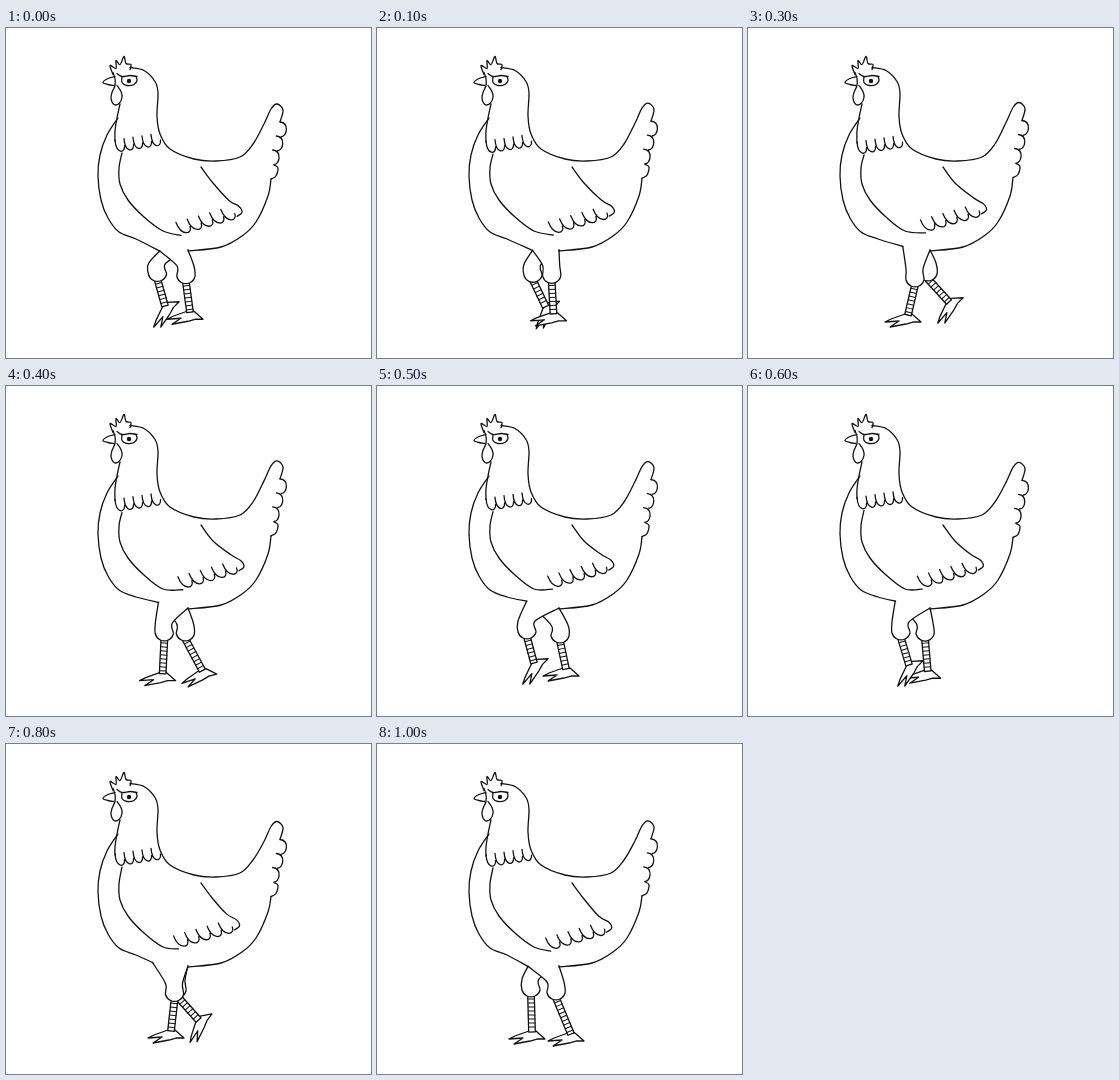
Recreate the animation shown at these times as an HTML page with a canvas. Size 365 px wide and 330 px high, loop 1100 ms.

```html
<!DOCTYPE html>
<html lang="en">
<head>
<meta charset="utf-8">
<title>Walking hen</title>
<style>
html, body { margin: 0; width: 100%; height: 100%; overflow: hidden; background: #fff; }
canvas { display: block; }
</style>
</head>
<body>
<canvas id="stage" width="365" height="330"></canvas>
<script>
const ctx = document.getElementById('stage').getContext('2d');
const STEP = 100, STEPS = 11;
const INK = '#111', PAPER = '#fff';

// One stride, shared by both legs: phase, knee x,y, ankle x,y, foot angle
const gait = [
  [0.3, 178, 253, 181, 285, 0],
  [2, 170, 254, 170, 287, 0],
  [3, 167, 257, 160, 287, 0],
  [4.5, 154, 251, 155, 288, 0],
  [5, 150, 251, 157, 277, -45],
  [6, 153, 252, 161, 279, -45],
  [7.5, 162, 253, 184, 278, -60],
  [8.5, 180, 251, 201, 274, -45],
  [10, 179, 254, 194, 290, 0],
  [10.5, 183, 255, 189, 283, 0]
];

function stride(phase) {
  phase %= STEPS;
  if (phase < gait[0][0]) phase += STEPS;
  let i = gait.length - 1;
  while (gait[i][0] > phase) i--;
  const a = gait[i], b = gait[(i + 1) % gait.length];
  const end = b[0] > a[0] ? b[0] : b[0] + STEPS;
  const k = (phase - a[0]) / (end - a[0]);
  return a.map((n, j) => n + (b[j] - n) * k).slice(1);
}

const pairs = list => {
  const out = [];
  for (let i = 0; i < list.length; i += 2) out.push([list[i], list[i + 1]]);
  return out;
};

// Smooth open curve through the points
function curve(list, fill) {
  const p = pairs(list), last = p.length - 1;
  ctx.beginPath();
  ctx.moveTo(...p[0]);
  for (let i = 0; i < last; i++) {
    const a = p[Math.max(i - 1, 0)], b = p[i], c = p[i + 1], d = p[Math.min(i + 2, last)];
    ctx.bezierCurveTo(b[0] + (c[0] - a[0]) / 6, b[1] + (c[1] - a[1]) / 6,
      c[0] - (d[0] - b[0]) / 6, c[1] - (d[1] - b[1]) / 6, ...c);
  }
  if (fill) ctx.fill();
  ctx.stroke();
}

function poly(list, fill) {
  ctx.beginPath();
  pairs(list).forEach(p => ctx.lineTo(...p));
  if (fill) { ctx.closePath(); ctx.fill(); }
  ctx.stroke();
}

// Row of feather tips; each ends partway down the side of the next
function feathers(x0, y0, x1, y1, count, dx, dy) {
  const sx = (x1 - x0) / count, sy = (y1 - y0) / count;
  ctx.beginPath();
  for (let i = 0; i < count; i++) {
    const x = x0 + sx * i, y = y0 + sy * i;
    const nx = x + sx + dx * 0.55, ny = y + sy + dy * 0.55;
    ctx.moveTo(x, y);
    ctx.bezierCurveTo(x + dx * 1.1, y + dy * 1.1, nx + dx * 0.6, ny + dy * 0.6, nx, ny);
  }
  ctx.stroke();
}

function at(x, y, draw, turn = 0) {
  ctx.save();
  ctx.translate(x, y);
  ctx.rotate(turn * Math.PI / 180);
  draw();
  ctx.restore();
}

function foot() {
  poly([-3, -1, -17, 4, -23, 7, -9, 6, -18, 12, -2, 9, 5, 7, 13, 7, 4, -1], true);
}

function leg([kx, ky, ax, ay, turn], hipX, hipY) {
  const len = Math.hypot(ax - kx, ay - ky);
  at(ax, ay, foot, turn);
  at(kx, ky, () => {
    poly([-3.3, 0, -3.3, len, 3.3, len, 3.3, 0], true);
    ctx.lineWidth = 1;
    for (let y = 4; y < len - 2; y += 4) poly([-3.3, y, 3.3, y]);
  }, Math.atan2(kx - ax, ay - ky) * 180 / Math.PI);
  curve([hipX, hipY, kx - 9, ky - 16, kx - 9, ky - 5, kx - 4, ky + 1, kx + 4, ky + 1,
    kx + 9, ky - 5, kx + 8, ky - 16, 182, 222], true);
}

function head() {
  curve([107, 45, 104, 36, 110, 39, 110, 31, 114, 35, 118, 27, 120, 34, 125, 35, 124, 40]);
  curve([109, 47, 102, 49, 97, 53, 102, 55, 108, 56]);
  curve([107, 43, 109, 49, 109, 56, 106, 63, 105, 69, 108, 75, 113, 74, 116, 68, 115, 62, 111, 56]);
  curve([111, 44, 116, 47, 124, 46, 131, 47]);
  curve([116, 47, 116, 53, 121, 56, 128, 55, 131, 51, 130, 47]);
  ctx.beginPath();
  ctx.arc(123, 51.5, 2.2, 0, 7);
  ctx.fillStyle = INK;
  ctx.fill();
  ctx.fillStyle = PAPER;
}

function bird(step) {
  const angle = 2 * Math.PI / STEPS;
  const sway = Math.sin(angle * step), bob = Math.cos(angle * step);
  const hipX = 151 + 5 * Math.sin(angle * (step + 1)), hipY = 219 + 4 * bob;
  const nod = 1.5, tail = 2 - 1.5 * sway, bib = 1 + 2 * sway;
  const wx = 2 + 2.5 * sway, wy = 2.2 * bob - 1.8;

  // the far leg is drawn first
  const legs = [stride(step + STEPS / 2), stride(step)];
  if (step > 6 && step < 10) legs.reverse();
  legs.forEach(l => leg(l, hipX, hipY));

  at(0, nod, head);

  // crown, neck, back and top of the tail
  curve([124, 38 + nod, 138, 41 + nod, 149, 52 + nod, 152, 65, 151, 88, 154, 106, 164, 121,
    188, 131, 210, 133, 234, 129, 247, 116, 258, 94 + tail, 265, 79 + tail,
    271, 74 + tail, 277, 80 + tail, 274, 92 + tail]);
  at(0, tail, () => {
    feathers(274, 92, 263, 134, 3, 9, 1);
    curve([268, 135, 272, 138, 270, 146, 265, 149]);
  });
  curve([265, 149 + tail, 262, 168, 250, 194, 236, 208, 215, 219, 182, 223]);

  // throat and chest
  curve([114, 76, 111, 90, 109, 103, 109, 112 + bib]);
  curve([112, 90, 101, 107, 94, 127, 92, 148, 95, 172, 102, 190, 113, 204, 130, 211, hipX, hipY]);
  feathers(109, 111 + bib, 154, 104 + bib, 5, 1, 13);

  // wing
  curve([116, 124 + bib, 113, 140, 114, 156, 122, 172, 138, 189, 157, 203, 173 + wx, 207 + wy]);
  at(wx, wy, () => feathers(168, 194, 224, 178, 5, 5, 13));
  curve([229 + wx, 188 + wy, 234 + wx, 184 + wy, 231 + wx, 178 + wy,
    221 + wx, 172 + wy, 207, 155, 195, 139]);
}

function frame(now) {
  ctx.fillStyle = PAPER;
  ctx.fillRect(0, 0, 365, 330);
  ctx.strokeStyle = INK;
  ctx.lineWidth = 1.3;
  ctx.lineCap = ctx.lineJoin = 'round';
  bird(Math.floor(Math.max(now, 0) / STEP) % STEPS);
  requestAnimationFrame(t => frame(t - start));
}

const start = performance.now();
frame(0);
</script>
</body>
</html>
```
